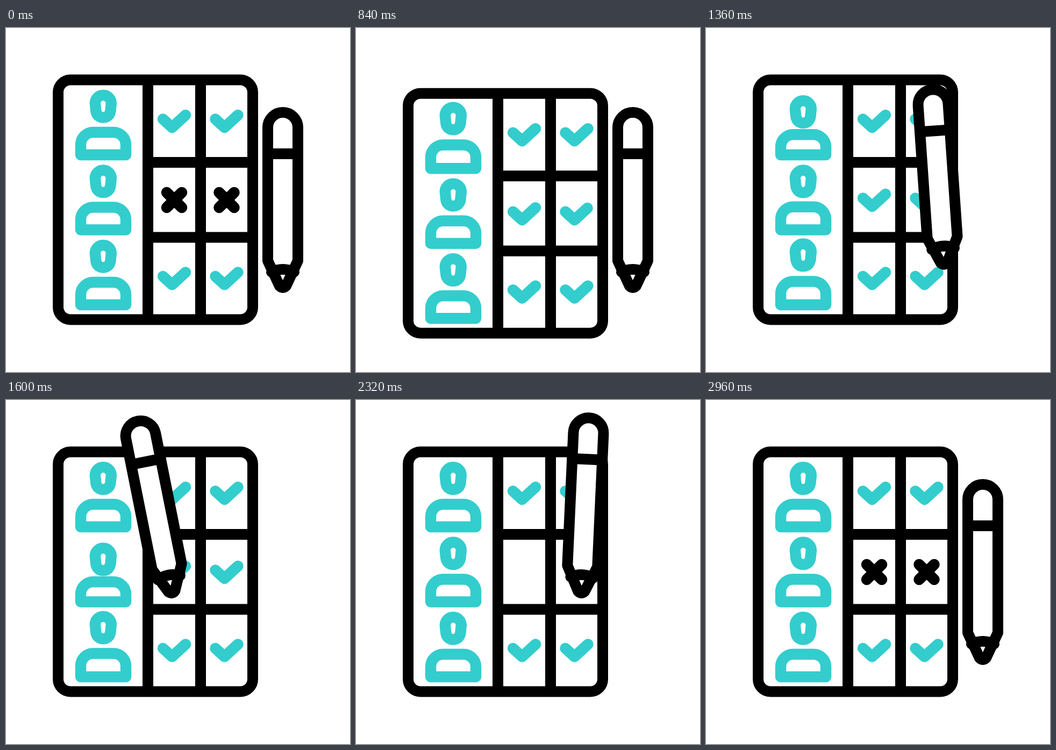
An HTML page with a canvas for the animation above (3000 ms loop, 640 by 640 pixels).

```html
<!DOCTYPE html>
<html lang="en">
<head>
<meta charset="utf-8">
<title>Checklist</title>
<style>
html, body { margin: 0; height: 100%; overflow: hidden; background: #fff; }
canvas { display: block; width: 640px; height: 640px; }
</style>
</head>
<body>
<canvas id="stage" width="640" height="640"></canvas>
<script>
const c = document.getElementById('stage').getContext('2d');
const LOOP = 3000, TEAL = '#33cdcd', BLACK = '#000';
const COL = 97.5, ROW = 139.5;

const board = new Path2D('M120 96.5H436A23 23 0 0 1 459 119.5V519.5A23 23 0 0 1 436 542.5H120A23 23 0 0 1 97 519.5V119.5A23 23 0 0 1 120 96.5Z' +
  'M264 97V542M362 97V542M264 250H459M264 389.5H459');
const head = new Path2D('M165.8 140a15 15 0 0 1 30 0l-1.4 14c-1 8-6 12.6-13.6 12.6s-12.6-4.6-13.6-12.6z');
const check = new Path2D('M292 169.5L309 185L334 162');
const CHECK_LEN = Math.hypot(17, 15.5) + Math.hypot(25, 23);
const pencil = new Path2D('M487 185a28 28 0 0 1 56 0V433L521 480Q515 486 509 480L487 433Z');
const pencilLines = new Path2D('M487 234H543M494 454Q515 444 536 454');

// Time, then tip offset x, y and tilt in degrees
const pencilKeys = [
  [1200, 0, 0, 0], [1600, -206, -124, -11.3], [1960, -197, -124, 11.1],
  [2080, -104, -124, -9.5], [2560, -88, -124, 14.5], [2960, 0, 0, 0]
];
// Time, then head shift and shoulder shift
const nodKeys = [[740, 0, 0], [960, -5.6, -3.6], [1320, 11.4, 4.8], [1520, 0, 0]];

// Smooth progress from 0 to 1 between two times
function ease(t, from, to) {
  const u = Math.min(1, Math.max(0, (t - from) / (to - from)));
  return (1 - Math.cos(Math.PI * u)) / 2;
}

function sample(keys, t) {
  let i = 0;
  while (i < keys.length - 2 && t > keys[i + 1][0]) i++;
  const a = keys[i], b = keys[i + 1], k = ease(t, a[0], b[0]);
  return a.slice(1).map((v, n) => v + (b[n + 1] - v) * k);
}

function stroke(path, color, width = 20.5) {
  c.strokeStyle = color;
  c.lineWidth = width;
  c.stroke(path);
}

function at(x, y, draw) {
  c.save();
  c.translate(x, y);
  draw();
  c.restore();
}

function drawPerson(t) {
  const [headY, bodyY] = sample(nodKeys, t);
  const top = 194 + bodyY;
  stroke(new Path2D(`M139 236V${top + 23}a23 23 0 0 1 23-23H200a23 23 0 0 1 23 23V236Z`), TEAL);
  at(0, headY, () => stroke(head, TEAL));
}

function drawCheck(start = 0, end = 1) {
  if (end - start < 0.002) return;
  c.setLineDash([CHECK_LEN * (end - start) + 0.1, 999]);
  c.lineDashOffset = -CHECK_LEN * start;
  stroke(check, TEAL);
  c.setLineDash([]);
}

function drawCross(size) {
  if (size < 0.002) return;
  const r = 14 * size;
  stroke(new Path2D(`M${313 - r} ${320 - r}L${313 + r} ${320 + r}M${313 + r} ${320 - r}L${313 - r} ${320 + r}`), BLACK);
}

function drawPencil(t) {
  const [x, y, tilt] = sample(pencilKeys, t);
  at(515 + x, 483 + y, () => {
    c.rotate(tilt * Math.PI / 180);
    c.translate(-515, -483);
    c.fillStyle = '#fff';
    c.fill(pencil);
    stroke(pencil, BLACK, 20);
    stroke(pencilLines, BLACK, 20);
  });
}

function draw(t) {
  c.fillStyle = '#fff';
  c.fillRect(0, 0, 640, 640);
  c.lineCap = c.lineJoin = 'round';
  const sink = 38.6 * (ease(t, 0, 600) - ease(t, 600, 1200));

  at(0, sink, () => {
    stroke(board, BLACK, 20);
    for (let i = 0; i < 3; i++) at(0, i * ROW, () => drawPerson(t - 260 * i));
    for (let i = 0; i < 2; i++) {
      const late = t - 80 * i;
      const wiped = i ? ease(t, 2080, 2560) : ease(t, 1600, 1960);
      at(i * COL, 0, () => drawCheck());
      at(i * COL, 292.5, () => drawCheck());
      at(i * COL, 147, () => drawCheck(wiped, ease(late, 400, 800)));
      at(i * COL, 0, () => drawCross(1 - ease(late, 0, 400) + ease(late, 2400, 2800)));
    }
  });
  drawPencil(t);
}

const begin = performance.now();
function tick() {
  draw((performance.now() - begin) % LOOP);
  requestAnimationFrame(tick);
}
tick();
</script>
</body>
</html>
```
